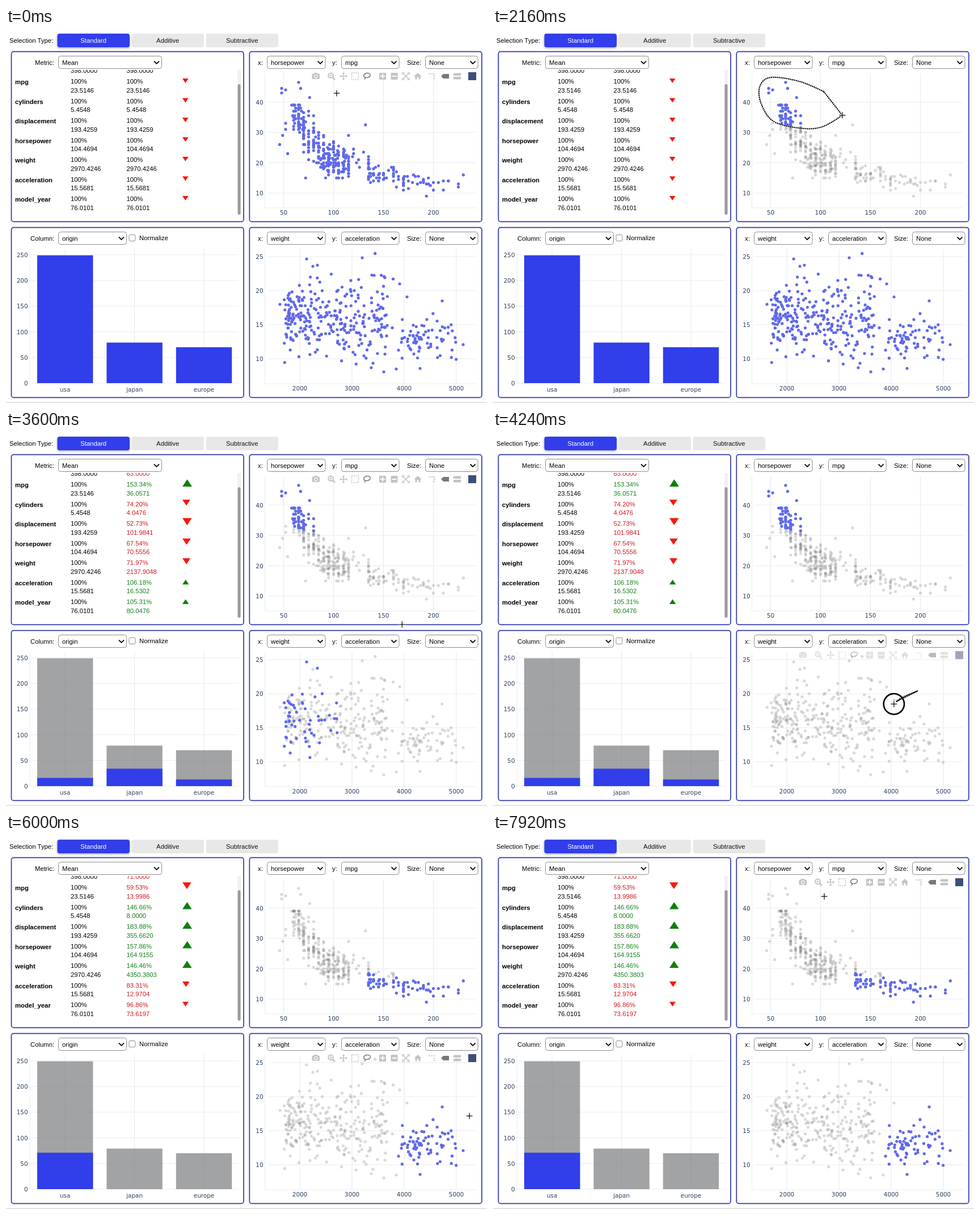
Write an HTML page with a canvas that moves like this. It is 848x661 px and loops after 8000 ms.

```html
<!DOCTYPE html>
<html lang="en">
<head>
<meta charset="utf-8">
<title>Linked selection dashboard</title>
<style>
html, body { margin: 0; width: 100%; height: 100%; overflow: hidden; background: #fff; }
canvas { display: block; }
</style>
</head>
<body>
<canvas id="stage" width="848" height="661"></canvas>
<script>
const ctx = document.getElementById('stage').getContext('2d');
const LOOP = 8000;
const BLUE = '#313eea', DOT = '#5f69e9', GRID = '#e9ebef', TICK = '#2a3f5f';
const UI = '11.3px "Liberation Sans", Arial, sans-serif';
const AXIS = '10.4px "DejaVu Sans", Verdana, sans-serif';

// ---- data -------------------------------------------------------------
let seed = 20;
const rnd = () => (seed = (Math.imul(seed, 1664525) + 1013904223) >>> 0) / 2 ** 32;
const bell = () => rnd() + rnd() + rnd() + rnd() - 2;
const times = (n, make) => Array.from({ length: n }, make);
const roundHp = hp => rnd() < .65 ? Math.round(hp / 5) * 5 : Math.round(hp);
const car = (hp, mpg, heavy = false) => ({
  x: 489.5 + (hp - 50) * 1.76,
  y: 291 - (Math.round(mpg * 2) / 2 - 10) * 5.35,
  heavy
});

const fuelPoints = [
  ...times(255, () => {
    const hp = roundHp(58 + 57 * rnd());
    const mpg = 17 + 17 * Math.exp((65 - hp) / 25) + bell() * (hp < 95 ? 6.5 : 4.5);
    return car(hp, Math.max(15, Math.min(39, mpg)));
  }),
  ...times(20, () => {
    const hp = roundHp(118 + 47 * rnd());
    return car(hp, 21 - (hp - 118) * .06 + bell() * 2.5);
  }),
  ...times(70, () => {
    const hp = roundHp(136 + 92 * rnd() ** 2);
    return car(hp, 15.3 - (hp - 150) * .04 + bell() * 2.2, true);
  }),
  ...[[46, 26], [48, 43.2], [48, 44.3], [52, 44], [49, 29], [52, 31], [52, 33], [54, 23], [65, 46.6], [67, 44.6],
    [76, 41.5], [72, 15], [115, 28.8], [132, 32.7]].map(p => car(...p)),
  ...[[193, 9], [230, 16]].map(p => car(...p, true))
];

const spot = (x, y) => ({ x, y, light: rnd() < .55 - (x - 490) / 190 });
const weightPoints = [
  ...times(290, () => {
    const u = rnd();
    return spot(494 + 186 * u ** 1.45 + bell() * 6, 511 - 4 * u + bell() * (42 + 26 * u));
  }),
  ...times(68, () => spot(692 + 103 * rnd() ** 1.4, 546 + bell() * 31)),
  ...[[483, 487], [530, 407], [541, 420], [549, 418], [628, 405], [649, 436], [694, 451], [707, 474], [769, 481],
    [806, 558], [730, 600], [688, 601], [666, 606]].map(p => spot(...p))
];

const fields = ['mpg', 'cylinders', 'displacement', 'horsepower', 'weight', 'acceleration', 'model_year'];
const means = [23.5146, 5.4548, 193.4259, 104.4694, 2970.4246, 15.5681, 76.0101];
const views = {
  all: { count: 398, means, bars: [249, 79, 70] },
  light: { count: 63, means: [36.0571, 4.0476, 101.9841, 70.5556, 2137.9048, 16.5302, 80.0476], bars: [16, 34, 13] },
  heavy: { count: 71, means: [13.9986, 8, 355.6620, 164.9155, 4350.3803, 12.9704, 73.6197], bars: [71, 0, 0] }
};

// ---- timeline ---------------------------------------------------------
const FIRST_UPDATE = 2780, SECOND_UPDATE = 5900, LAG = 20;
const stroke = (start, end, points) => ({ start, end, points });
const strokes = [
  stroke(400, 2060, [[583, 112], [540, 94], [489, 87], [470, 104], [473, 134], [495, 165], [545, 177], [581, 174], [616, 154]]),
  stroke(4048, 5392, [[749, 458], [707, 481], [683, 540], [697, 590], [768, 607], [838, 602], [838, 537], [817, 497]])
];
const travel = [[0, 583, 115], [400, 583, 112], [2060, 616, 154], [2800, 616, 151], [3050, 616, 151], [4000, 749, 458],
  [4048, 749, 458], [5392, 817, 497], [6900, 817, 497], [7700, 584, 110], [8000, 584, 110]];

// Catmull-Rom curve through evenly timed points
function strokeAt({ start, end, points }, t) {
  const last = points.length - 1;
  const s = (t - start) / (end - start) * last;
  const i = Math.min(Math.floor(s), last - 1), u = s - i;
  const [a, b, c, d] = [i - 1, i, i + 1, i + 2].map(k => points[Math.max(0, Math.min(last, k))]);
  return [0, 1].map(k => b[k] + u / 2 * (c[k] - a[k] + u * (2 * a[k] - 5 * b[k] + 4 * c[k] - d[k]
    + u * (3 * (b[k] - c[k]) + d[k] - a[k]))));
}

function cursorAt(t) {
  const active = strokes.find(s => t >= s.start && t <= s.end);
  if (active) return strokeAt(active, t);
  const i = Math.max(1, travel.findIndex(k => k[0] >= t));
  const [t0, x0, y0] = travel[i - 1], [t1, x1, y1] = travel[i];
  let u = (t - t0) / (t1 - t0);
  u = u * u * (3 - 2 * u);
  return [x0 + (x1 - x0) * u, y0 + (y1 - y0) * u];
}

function lassoAt(s, t) {
  const end = Math.max(s.start, Math.min(t - LAG, s.end));
  const path = new Path2D();
  const add = time => {
    const [x, y] = strokeAt(s, time);
    path.lineTo(Math.min(x, 828), y);
  };
  for (let time = s.start; time < end; time += 48) add(time);
  add(end);
  path.closePath();
  return path;
}

const within = (t, a, b) => t >= a && t < b;
const clamp = v => Math.max(0, Math.min(1, v));
const shown = (t, spans) => Math.max(...spans.map(([a, b]) => Math.min(clamp((t - a) / 300), 1 - clamp((t - b) / 300))));

// ---- drawing helpers --------------------------------------------------
function text(s, x, y, { font = UI, color = '#000', align = 'left' } = {}) {
  ctx.font = font;
  ctx.fillStyle = color;
  ctx.textAlign = align;
  ctx.fillText(s, x, y);
}
function box(x, y, w, h, r, fill, stroke, width = 1) {
  ctx.beginPath();
  ctx.roundRect(x, y, w, h, r);
  if (fill) { ctx.fillStyle = fill; ctx.fill(); }
  if (stroke) { ctx.strokeStyle = stroke; ctx.lineWidth = width; ctx.stroke(); }
}
function ring(x, y, rx, ry, color, width) {
  ctx.beginPath();
  ctx.ellipse(x, y, rx, ry, -.2, 0, 7);
  ctx.strokeStyle = color;
  ctx.lineWidth = width;
  ctx.stroke();
}
function line(color, width, ...p) {
  ctx.strokeStyle = color;
  ctx.lineWidth = width;
  ctx.beginPath();
  for (let i = 0; i < p.length; i += 2) ctx.lineTo(p[i], p[i + 1]);
  ctx.stroke();
}
function shape(color, ...p) {
  ctx.fillStyle = color;
  ctx.beginPath();
  for (let i = 0; i < p.length; i += 2) ctx.lineTo(p[i], p[i + 1]);
  ctx.fill();
}
function plus(x, y, r, color, width) {
  line(color, width, x - r, y, x + r, y);
  line(color, width, x, y - r, x, y + r);
}
function dropdown(label, labelX, x, y, w, value) {
  text(label, labelX, y + 15.5);
  box(x + .5, y + .5, w - 1, 22, 4, '#fff', '#8c8c8c');
  text(value, x + 7, y + 16);
  line('#111', 1.8, x + w - 14, y + 9.5, x + w - 9.5, y + 14, x + w - 5, y + 9.5);
}

function header() {
  text('Selection Type:', 6, 26);
  ['Standard', 'Additive', 'Subtractive'].forEach((name, i) => {
    const x = 90.5 + i * 131;
    ctx.save();
    if (!i) { ctx.shadowColor = 'rgba(0,0,0,.35)'; ctx.shadowBlur = 4; ctx.shadowOffsetY = 1.5; }
    box(x, 10, 127.5, 24, 4, i ? '#e8e8e8' : BLUE);
    ctx.restore();
    text(name, x + 63.7, 26, { color: i ? '#111' : '#fff', align: 'center' });
  });
}

function table(view) {
  dropdown('Metric:', 51, 92, 49, 183, 'Mean');
  ctx.save();
  ctx.beginPath();
  ctx.rect(11, 74, 406, 266);
  ctx.clip();
  const tone = ratio => ratio === 1 ? '#000' : ratio > 1 ? '#128018' : '#cf1720';
  text('398.0000', 114, 79);
  text(view.count.toFixed(4), 212.5, 79, { color: tone(view.count / 398) });
  fields.forEach((name, i) => {
    const y = 98 + i * 34.5, ratio = view.means[i] / means[i], color = tone(ratio);
    text(name, 16, y + 1, { font: 'bold ' + UI });
    text('100%', 114, y);
    text(means[i].toFixed(4), 114, y + 15.5);
    text(ratio === 1 ? '100%' : (ratio * 100).toFixed(2) + '%', 212.5, y, { color });
    text(view.means[i].toFixed(4), 212.5, y + 15.5, { color });
    const w = 10.6 + 6.4 * Math.min(1, Math.abs(ratio - 1) / .5), h = w * .75;
    if (ratio > 1) shape('#0a810a', 311, y, 311 + w, y, 311 + w / 2, y - h);
    else shape('#f4190b', 311, y - 1 - h, 311 + w, y - 1 - h, 311 + w / 2, y - 1);
  });
  box(408, 74, 6, 255, 0, '#f1f1f1');
  box(408.5, 99, 5, 230, 2.5, '#9b9b9b');
  ctx.restore();
}

function barChart(view, linked) {
  dropdown('Column:', 43, 92, 359, 121, 'origin');
  box(217, 364.5, 11, 11, 2, '#fff', '#8c8c8c');
  text('Normalize', 235, 374);
  line(GRID, 1, 42.5, 389, 42.5, 626);
  for (let v = 0; v <= 250; v += 50) {
    const y = 626 - v * .905;
    line(GRID, 1.2, 42, y, 410, y);
    text(v, 38.5, y + 4, { font: AXIS, color: TICK, align: 'right' });
  }
  ['usa', 'japan', 'europe'].forEach((name, i) => {
    const mid = 104.2 + i * 122.4;
    line(GRID, 1.2, mid, 389, mid, 626);
    const bar = (n, color) => {
      ctx.fillStyle = color;
      ctx.fillRect(mid - 49.2, 626 - n * .905, 98.4, n * .905);
    };
    if (linked) bar(views.all.bars[i], 'rgba(127,128,131,.72)');
    bar(view.bars[i], BLUE);
    text(name, mid, 641, { font: AXIS, color: TICK, align: 'center' });
  });
}

function modebar(cy, alpha) {
  if (!alpha) return;
  const g = '#c3c3c3', dark = '#777';
  ctx.save();
  ctx.globalAlpha = alpha;
  ctx.translate(0, cy);
  // camera, zoom
  box(539.5, -4.5, 13.5, 9.5, 2, g);
  box(543, -6, 6, 3, 1, g);
  ring(546.2, .3, 2.8, 2.8, '#fff', 1.2);
  ring(572.5, -1.3, 4.3, 4.3, g, 2);
  line(g, 2.4, 575.5, 2, 580, 6);
  plus(572.5, -1.3, 2, g, 1.4);
  // pan
  plus(595, 0, 6, g, 1.5);
  for (let i = 0; i < 4; i++) {
    ctx.save();
    ctx.translate(595, 0);
    ctx.rotate(i * Math.PI / 2);
    shape(g, 7, 0, 4, -2.6, 4, 2.6);
    ctx.restore();
  }
  // box select, lasso
  ctx.setLineDash([2, 1.5]);
  box(609.5, -6, 12, 12, 0, null, g, 1.5);
  ctx.setLineDash([]);
  ring(636.5, -1.5, 6, 4, dark, 1.5);
  line(dark, 1.5, 631.5, 1, 633.5, 3, 632, 6);
  // zoom in, zoom out
  for (const x of [664, 684.5]) {
    box(x - 6, -6, 12, 12, 1, g);
    line('#fff', 2, x - 4, 0, x + 4, 0);
  }
  line('#fff', 2, 664, -4, 664, 4);
  // autoscale, home
  for (const sx of [-1, 1]) for (const sy of [-1, 1]) {
    line(g, 1.4, 705 + sx * 2.5, sy * 6, 705 + sx * 6.2, sy * 6, 705 + sx * 6.2, sy * 2.5);
    line(g, 1.6, 705, 0, 705 + sx * 4.5, sy * 4.5);
  }
  shape(g, 719.5, 0, 726, -6, 732.5, 0);
  for (const x of [721.5, 727.5]) box(x, 0, 3, 5.5, 0, g);
  box(721.5, 0, 9, 1.5, 0, g);
  // spikes, hover modes, badge
  ctx.setLineDash([2, 2]);
  line(g, 2, 746, -4, 755, -4, 755, 6);
  ctx.setLineDash([]);
  shape(dark, 767, 0, 771, -4, 781, -4, 781, 4, 771, 4);
  for (const y of [-5.5, 1]) shape(g, 788, y + 2.2, 790, y, 802, y, 802, y + 4.5, 790, y + 4.5);
  box(815, -7, 14, 14, 0, '#3f4d78');
  ctx.restore();
}

function scatter(top, names, xTicks, yTicks, points, selected) {
  dropdown('x:', 444, 460, top + 8, 103.5, names[0]);
  dropdown('y:', 575, 591, top + 8, 102.5, names[1]);
  dropdown('Size:', 707, 739, top + 8, 93.5, 'None');
  const y0 = top + 39, y1 = top + 276;
  line(GRID, 1, 456.5, y0, 456.5, y1, 829, y1);
  xTicks.forEach(([label, x]) => {
    line(GRID, 1.2, x, y0, x, y1);
    text(label, x, y1 + 12, { font: AXIS, color: TICK, align: 'center' });
  });
  yTicks.forEach(([label, y]) => {
    line(GRID, 1.2, 461, y, 829, y);
    text(label, 453.5, y + 4, { font: AXIS, color: TICK, align: 'right' });
  });
  const dots = (list, color) => {
    ctx.fillStyle = color;
    list.forEach(p => {
      ctx.beginPath();
      ctx.arc(p.x, p.y, 2.6, 0, 7);
      ctx.fill();
    });
  };
  const on = points.map(selected);
  dots(points.filter((_, i) => !on[i]), 'rgba(128,128,128,.3)');
  dots(points.filter((_, i) => on[i]), DOT);
}

function outline(path) {
  ctx.lineWidth = 2;
  ctx.strokeStyle = '#fff';
  ctx.stroke(path);
  ctx.setLineDash([2.4, 1]);
  ctx.strokeStyle = '#000';
  ctx.stroke(path);
  ctx.setLineDash([]);
}

function pointer(t) {
  const [x, y] = cursorAt(t);
  plus(x, y, 6, '#fff', 3);
  plus(x, y, 5.5, '#000', 1.2);
  if (within(t, 360, 2100) || within(t, 4000, 5520)) ring(x, y, 18.2, 18.2, '#000', 2.6);
}

const ticks = (start, step, at, gap) => times(4, (_, i) => [start + i * step, at + i * gap]);

function draw(t) {
  const view = t < FIRST_UPDATE ? views.all : t < SECOND_UPDATE ? views.light : views.heavy;
  const [first, second] = strokes.map(s => lassoAt(s, t));
  const inside = path => p => ctx.isPointInPath(path, p.x, p.y);
  const all = () => true;

  ctx.fillStyle = '#fff';
  ctx.fillRect(0, 0, 848, 661);
  ctx.fillStyle = '#dcdcdc';
  ctx.fillRect(0, 659.5, 848, 1.5);
  header();
  for (const x of [9.5, 429.3]) for (const y of [41.7, 351.7]) box(x, y, 409.5, 299.7, 4, '#fff', '#2e38ab', 1.7);

  table(view);
  barChart(view, view !== views.all);
  scatter(41, ['horsepower', 'mpg'], ticks(50, 50, 489.5, 88), ticks(10, 10, 291, -53.5), fuelPoints,
    t < 460 ? all : t < SECOND_UPDATE ? inside(first) : p => p.heavy);
  scatter(351, ['weight', 'acceleration'], ticks(2000, 1000, 518, 92), ticks(10, 5, 583, -60), weightPoints,
    t < FIRST_UPDATE ? all : t < 4100 ? p => p.light : inside(second));

  modebar(85, shown(t, [[-400, 400], [2830, 3600], [7230, 9000]]));
  modebar(395, shown(t, [[3660, 4090], [5560, 7200]]));
  if (within(t, 460, FIRST_UPDATE)) outline(first);
  if (within(t, 4100, SECOND_UPDATE)) outline(second);
  pointer(t);
}

const begin = performance.now();
function tick() {
  draw((performance.now() - begin) % LOOP);
  requestAnimationFrame(tick);
}
tick();
</script>
</body>
</html>
```
